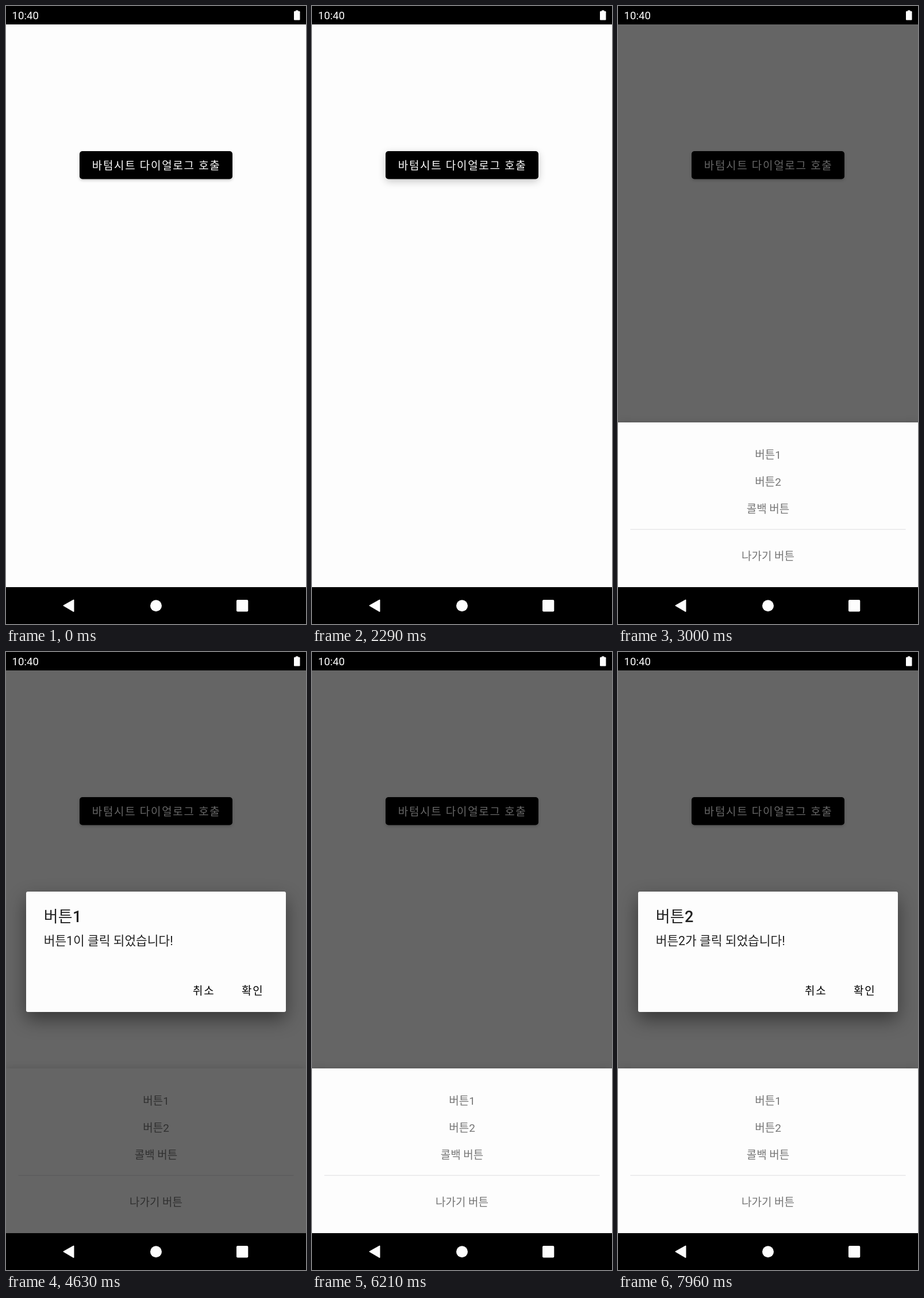
These frames come from a looping animation (522 by 1073 pixels, 8000 ms). An HTML page with a canvas:

```html
<!DOCTYPE html>
<html lang="ko">
<head>
<meta charset="utf-8">
<title>Bottom sheet demo</title>
<style>
  html, body { margin: 0; width: 100%; height: 100%; overflow: hidden; background: #000; }
  canvas { display: block; }
</style>
</head>
<body>
<canvas id="stage" width="522" height="1073"></canvas>
<script>
const W = 522, H = 1073, LOOP = 8000;
const STATUS_BOTTOM = 32, NAV_TOP = 1009, SHEET_TOP = 723;
const PAPER = '#fdfdfd', DIM = 0.6, CAPS_SPACING = 1.7;
const FONT = 'Roboto, "Noto Sans CJK KR", "Noto Sans CJK JP", sans-serif';
const SHEET_OPEN = 2374;
const DIALOGS = [
  { open: 4000, close: 5380, digit: '1', body: '버튼1이 클릭 되었습니다!' },
  { open: 6460, close: 7960, digit: '2', body: '버튼2가 클릭 되었습니다!' }
];
const EXIT_DELAY = 40, FADE = 150, SCALE = 220;

const ctx = document.getElementById('stage').getContext('2d');

const progress = (t, start, duration) => Math.min(1, Math.max(0, (t - start) / duration));
const decelerate = (p, power) => 1 - (1 - p) ** power;
const easeInOut = p => (1 - Math.cos(Math.PI * p)) / 2;

function rect(x, y, w, h, color) {
  ctx.fillStyle = color;
  ctx.fillRect(x, y, w, h);
}

function roundRect(x, y, w, h, r, color, shadow) {
  ctx.save();
  if (shadow) {
    ctx.shadowColor = `rgba(0,0,0,${shadow.alpha})`;
    ctx.shadowBlur = shadow.blur;
    ctx.shadowOffsetY = shadow.y;
  }
  ctx.fillStyle = color;
  ctx.beginPath();
  ctx.roundRect(x, y, w, h, r);
  ctx.fill();
  ctx.restore();
}

function text(str, x, y, size, color, { align = 'left', weight = 400, spacing = 0 } = {}) {
  ctx.font = `${weight} ${size}px ${FONT}`;
  ctx.textAlign = align;
  ctx.letterSpacing = spacing + 'px';
  ctx.fillStyle = color;
  ctx.fillText(str, x, y);
  return ctx.measureText(str).width;
}

function drawPage(t) {
  rect(0, 0, W, H, '#000');
  rect(0, STATUS_BOTTOM, W, NAV_TOP - STATUS_BOTTOM, PAPER);
  const press = progress(t, 2150, 100) - progress(t, 2400, 100);
  roundRect(128, 252, 266, 48.5, 5, '#000', { alpha: 0.22, blur: 5 + 9 * press, y: 2 + 2 * press });
  text('바텀시트 다이얼로그 호출', 149.7, 284, 19, PAPER, { spacing: CAPS_SPACING });
}

function drawDim(alpha) {
  rect(0, STATUS_BOTTOM, W, NAV_TOP - STATUS_BOTTOM, `rgba(0,0,0,${alpha})`);
}

function drawSheet(t) {
  const shown = easeInOut(progress(t, SHEET_OPEN, 150));
  const gray = '#757575', centered = { align: 'center' };
  ctx.save();
  ctx.globalAlpha = shown;
  ctx.translate(0, (1 - shown) * 0.2 * H);
  roundRect(0, SHEET_TOP, W, NAV_TOP - SHEET_TOP, 0, PAPER, { alpha: 0.2, blur: 14, y: 2 });
  text('버튼1', 261, 786, 19, gray, centered);
  text('버튼2', 261, 833, 19, gray, centered);
  text('콜백 버튼', 261, 880, 19, gray, centered);
  rect(21.5, 908, 479, 1.3, '#e4e4e6');
  text('나가기 버튼', 261, 961.5, 19, gray, centered);
  ctx.restore();
}

function drawDialog(t, { open, close, digit, body }) {
  const exit = close + EXIT_DELAY;
  const alpha = decelerate(progress(t, open + 10, FADE), 3) - decelerate(progress(t, exit, FADE), 3);
  if (alpha <= 0) return;
  const grow = decelerate(progress(t, open + 10, SCALE), 5) - decelerate(progress(t, exit, SCALE), 5);
  const scale = 0.9 + 0.1 * grow;
  const ink = '#212121';
  ctx.save();
  ctx.globalAlpha = alpha;
  ctx.translate(261, 520.5);
  ctx.scale(scale, scale);
  ctx.translate(-261, -520.5);
  roundRect(35, 416, 452, 209, 3, PAPER, { alpha: 0.45, blur: 32, y: 13 });
  const width = text('버튼', 65.7, 469, 27, ink, { spacing: 0.3 });
  text(digit, 65.7 + width, 469, 27, ink, { weight: 500 });
  text(body, 65.7, 509, 21.4, ink);
  text('취소', 325, 595, 19, '#000', { spacing: CAPS_SPACING });
  text('확인', 410, 595, 19, '#000', { spacing: CAPS_SPACING });
  ctx.restore();
}

function drawSystemIcons() {
  text('10:40', 10.6, 23, 18.6, '#fff');
  roundRect(501, 9, 10.5, 15.5, 1.2, PAPER);
  rect(504, 7.5, 4.5, 2, PAPER);

  ctx.fillStyle = ctx.strokeStyle = PAPER;
  ctx.lineWidth = 2;
  ctx.lineJoin = 'round';
  ctx.beginPath();
  ctx.moveTo(100.5, 1041);
  ctx.lineTo(117.5, 1031.5);
  ctx.lineTo(117.5, 1051);
  ctx.closePath();
  ctx.fill();
  ctx.stroke();
  ctx.beginPath();
  ctx.arc(261, 1041.2, 10, 0, Math.PI * 2);
  ctx.fill();
  roundRect(401, 1031, 20.3, 20.5, 2, PAPER);
}

function draw(t) {
  const dim = DIM * progress(t, SHEET_OPEN, 210);
  // A single dim layer sits right below the topmost active window.
  const sheetDimmed = DIALOGS.some(d => t >= d.open && t < d.close);
  drawPage(t);
  if (!sheetDimmed) drawDim(dim);
  if (t >= SHEET_OPEN) {
    if (sheetDimmed) {
      drawSheet(t);
      drawDim(dim);
    } else {
      drawSheet(t);
    }
  }
  DIALOGS.forEach(d => drawDialog(t, d));
  drawSystemIcons();
}

const start = performance.now();
function tick() {
  draw((performance.now() - start) % LOOP);
  requestAnimationFrame(tick);
}
tick();
</script>
</body>
</html>
```
